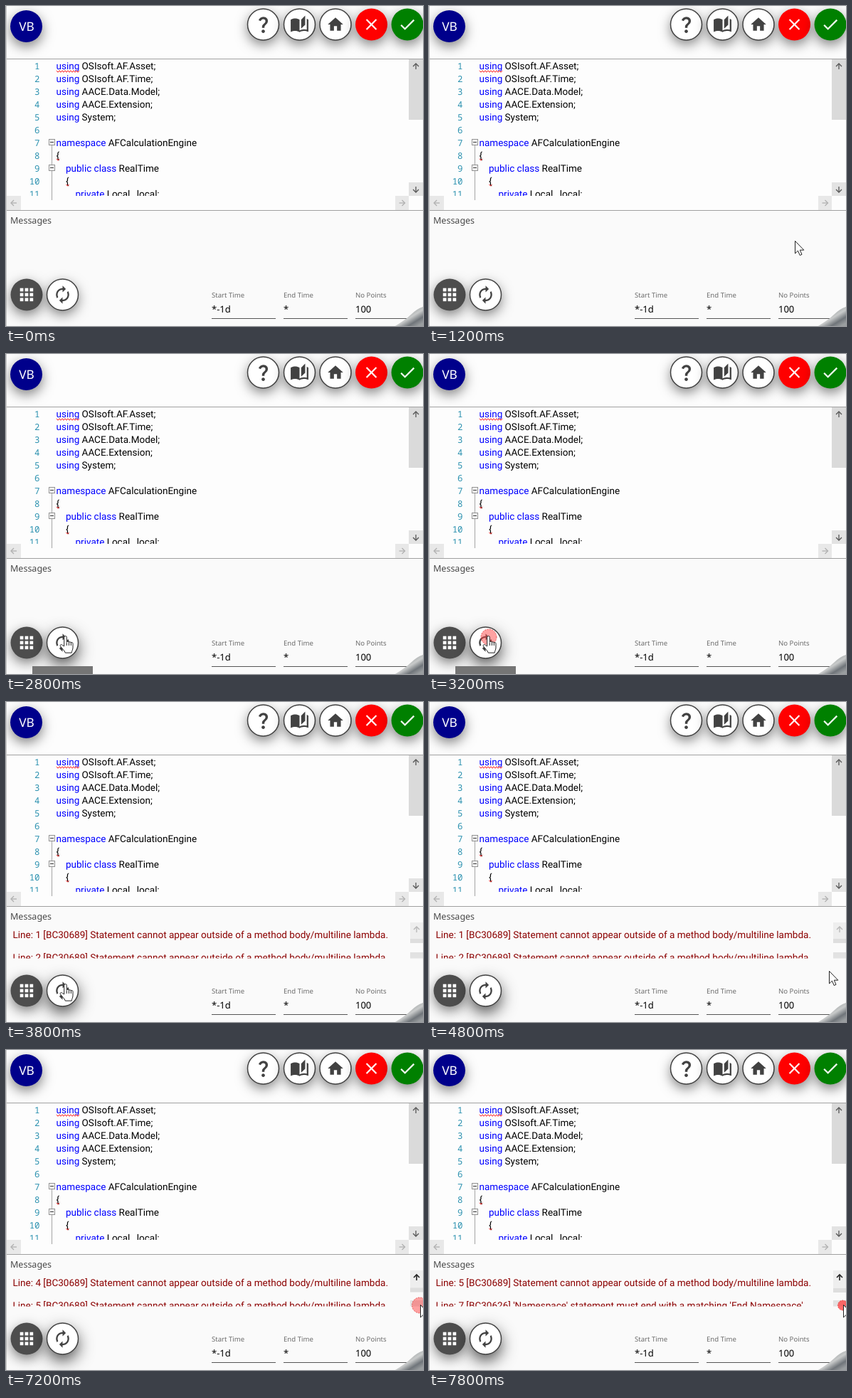
These frames come from a looping animation (586x450 px, 8000 ms). An HTML page with a canvas:

```html
<!DOCTYPE html>
<html lang="en">
<head>
<meta charset="utf-8">
<title>Code editor</title>
<style>
  html, body { margin: 0; width: 100%; height: 100%; overflow: hidden; background: #fafafa; }
  canvas { display: block; width: 586px; height: 450px; }
</style>
</head>
<body>
<canvas id="stage" width="586" height="450"></canvas>
<script>
const ctx = document.getElementById('stage').getContext('2d');
const LOOP = 8000, STEP = 200;
const CODE_FONT = '13.5px Roboto, sans-serif';
const MSG_FONT = '13.55px Roboto, sans-serif';
const UI = '"Noto Sans", sans-serif';
const DARK = '#424242', BLUE = '#0000ff', MAROON = '#8b0000';

const code = [
  'using| OSIsoft.AF.Asset;', 'using| OSIsoft.AF.Time;', 'using| AACE.Data.Model;',
  'using| AACE.Extension;', 'using| System;', '', 'namespace| AFCalculationEngine',
  '|{', 'public class| RealTime', '|{', 'private| Local _local;'
];
const indent = [0, 0, 0, 0, 0, 0, 0, 0, 13.5, 13.5, 27];

const outside = n => `Line: ${n} [BC30689] Statement cannot appear outside of a method body/multiline lambda.`;
const messages = [1, 2, 3, 4, 5].map(outside)
  .concat("Line: 7 [BC30626] 'Namespace' statement must end with a matching 'End Namespace'.");

// time, x, y of the pointer tip
const pointerPath = [
  [1200, 514, 330], [1600, 300, 338], [1800, 190, 346], [2000, 117, 364], [2200, 92, 383],
  [2400, 75.5, 396], [3800, 75.5, 396], [4000, 120, 399], [4200, 235, 406], [4400, 400, 414],
  [4600, 554, 412], [4800, 562, 378], [5000, 572, 362], [5200, 578, 348], [5600, 582, 358]
];

const icons = {
  help: new Path2D('M11.07 12.85c.77-1.39 2.25-2.21 3.11-3.44.91-1.29.4-3.7-2.18-3.7-1.69 0-2.52 1.28-2.87 2.34L6.54 6.96C7.25 4.83 9.18 3 11.99 3c2.35 0 3.96 1.07 4.78 2.41.7 1.15 1.11 3.3.03 4.9-1.2 1.77-2.35 2.31-2.97 3.45-.25.46-.35.76-.35 2.24h-2.89c-.01-.78-.13-2.05.48-3.15zM14 20c0 1.1-.9 2-2 2s-2-.9-2-2 .9-2 2-2 2 .9 2 2z'),
  book: new Path2D('M19 1l-5 5v11l5-4.5zM1 6v15.2C3 20.4 5 20 6.5 20c1.95 0 4.05.4 5.5 1.5V6c-1.45-1.1-3.55-1.5-5.5-1.5S2.45 4.9 1 6zm22 0c-.6-.45-1.25-.75-2-1v13.5c-1.1-.35-2.3-.5-3.5-.5-1.7 0-4.15.65-5.5 1.5v2c1.35-.85 3.8-1.5 5.5-1.5 1.65 0 3.35.3 5.5 1.1z'),
  home: new Path2D('M10 20v-6h4v6h5v-8h3L12 3 2 12h3v8z'),
  close: new Path2D('M19 6.4 17.6 5 12 10.6 6.4 5 5 6.4 10.6 12 5 17.6 6.4 19 12 13.4 17.6 19 19 17.6 13.4 12z'),
  check: new Path2D('M9 16.2 4.8 12l-1.4 1.4L9 19 21 7l-1.4-1.4z'),
  refresh: new Path2D('M12 6v3l4-4-4-4v3c-4.42 0-8 3.58-8 8 0 1.57.46 3.03 1.24 4.26L6.7 14.8c-.45-.83-.7-1.79-.7-2.8 0-3.31 2.69-6 6-6zm6.76 1.74L17.3 9.2c.44.84.7 1.79.7 2.8 0 3.31-2.69 6-6 6v-3l-4 4 4 4v-3c4.42 0 8-3.58 8-8 0-1.57-.46-3.03-1.24-4.26z')
};
const arrowShape = new Path2D('M.5 .5V18l4-3.8 2.7 6.4 2.8-1.2-2.7-6.2h5.5z');
const handShape = new Path2D('M6.2 15V2.4a1.8 1.8 0 0 1 3.6 0V9a1.7 1.7 0 0 1 3.1 .5 1.6 1.6 0 0 1 2.9 .7 1.5 1.5 0 0 1 2.7 1V17c0 3-1.6 4.5-1.8 7.2H7.8C7.3 21.5 2.5 17.5 .8 14.8c-1-1.8 1.6-3 3-1.4z');

function rect(x, y, w, h, fill) {
  ctx.fillStyle = fill;
  ctx.fillRect(x, y, w, h);
}

function text(s, x, y, font, fill, align = 'left') {
  ctx.font = font;
  ctx.fillStyle = fill;
  ctx.textAlign = align;
  ctx.fillText(s, x, y);
  return ctx.measureText(s).width;
}

function line(points, color, width = 1) {
  ctx.beginPath();
  points.forEach(([x, y]) => ctx.lineTo(x, y));
  ctx.strokeStyle = color;
  ctx.lineWidth = width;
  ctx.stroke();
}

function clipped(x, y, w, h, draw) {
  ctx.save();
  ctx.beginPath();
  ctx.rect(x, y, w, h);
  ctx.clip();
  draw();
  ctx.restore();
}

function disc(x, y, r, fill, border, raised) {
  ctx.save();
  ctx.shadowColor = raised ? 'rgba(0,0,0,.7)' : 'rgba(0,0,0,.5)';
  ctx.shadowBlur = raised ? 22 : 17;
  ctx.shadowOffsetY = raised ? 9 : 6;
  ctx.beginPath();
  ctx.arc(x, y, r, 0, Math.PI * 2);
  ctx.fillStyle = fill;
  ctx.fill();
  ctx.restore();
  if (border) {
    ctx.strokeStyle = border;
    ctx.lineWidth = 1.5;
    ctx.stroke();
  }
}

function icon(name, x, y, scale, fill) {
  ctx.save();
  ctx.translate(x, y);
  ctx.scale(scale, scale);
  ctx.translate(-12, -12);
  ctx.fillStyle = fill;
  ctx.fill(icons[name]);
  ctx.restore();
}

// Scrollbar arrow pointing along (dx, dy)
function chevron(x, y, dx, dy, color, width = 1.3) {
  const tip = [x + dx * 4, y + dy * 4];
  line([[x - dx * 4, y - dy * 4], tip], color, width);
  line([[x + dy * 4, y + dx * 4], tip, [x - dy * 4, y - dx * 4]], color, width);
}

function squiggle(x, y, w) {
  const pts = [];
  for (let i = 0; i <= w; i += 2) pts.push([x + i, y + (i % 4 ? 1.2 : -1.2)]);
  line(pts, '#ff2020');
}

function drawToolbar() {
  disc(28.5, 28.5, 22.5, '#00008b');
  text('VB', 29, 35, '500 17.3px ' + UI, '#fff', 'center');
  [361.5, 412.5, 463].forEach(x => disc(x, 26, 22, '#fff', DARK));
  disc(513.5, 26, 22.5, '#ff0000');
  disc(564, 26, 22.5, '#008000');

  icon('help', 361.5, 26, 1.2, DARK);
  icon('book', 412.5, 26, 1.13, DARK);
  icon('home', 463, 26, 1.08, DARK);
  icon('close', 513.5, 26, 1.1, '#fff');
  icon('check', 564, 26, 1.12, '#fff');
}

function drawCode() {
  clipped(0, 75, 566, 192, () => {
    code.forEach((row, i) => {
      const y = 89 + i * 18, [key, rest = ''] = row.split('|');
      text(i + 1, 47.5, y, '500 12.4px "Noto Sans Mono", monospace', '#2b91af', 'right');
      const x = 70.5 + indent[i];
      text(rest, x + text(key, x, y, CODE_FONT, BLUE), y, CODE_FONT, '#000');
    });
    squiggle(71, 92, 32);
    squiggle(71, 216, 4);
    squiggle(84.5, 252, 4);
  });
}

function drawFolds() {
  line([[64.5, 196], [64.5, 273]], '#a5a5a5');
  [187, 223].forEach(y => {
    rect(60, y, 9, 9, '#fff');
    ctx.strokeStyle = '#909090';
    ctx.lineWidth = 1;
    ctx.strokeRect(60.5, y + .5, 8, 8);
    rect(62, y + 4, 5, 1, '#333');
  });
}

function drawEditor() {
  rect(0, 74, 586, 214, '#fdfdfd');
  drawCode();
  drawFolds();
  rect(566, 75, 20, 85, '#dadada');
  rect(566, 248, 20, 19, '#e3e3e3');
  chevron(576, 85, 0, -1, '#555');
  chevron(576, 258, 0, 1, '#555');
  rect(1, 267, 20, 20, '#e8e8e8');
  rect(547, 267, 19, 20, '#e8e8e8');
  chevron(11, 277, -1, 0, '#b0b0b0');
  chevron(556.5, 277, 1, 0, '#b0b0b0');
  rect(0, 74, 586, 1, '#a0a0a0');
  rect(0, 287, 586, 1, '#a0a0a0');
  rect(0, 0, 1, 450, '#c8c8c8');
}

function drawMessages(t) {
  text('Messages', 6, 306, '12.5px ' + UI, '#484848');
  if (t < 3400) return;
  const top = t < 6400 ? 0 : Math.min(4, 1 + Math.floor((t - 6400) / 400));
  clipped(1, 309, 566, 51.5, () => {
    text(messages[top], 9.5, 332, MSG_FONT, MAROON);
    text(messages[top + 1], 9.5, 364, MSG_FONT, MAROON);
  });
  const hot = t >= 5200;
  rect(568, 310, 18, 28, '#eeeeee');
  rect(568, 333 + top * .5, 18, 6, '#dedede');
  rect(568, 352, 18, 8.5, '#e2e2e2');
  chevron(577, 320, 0, -1, hot ? '#222' : '#b5b5b5', hot ? 1.6 : 1.3);
}

function drawField(label, value, x, w) {
  text(label, x, 409.5, '9.6px ' + UI, '#6c6c6c');
  text(value, x, 431, '13px ' + UI, '#000');
  rect(x, 439, w, 1, '#555');
}

function drawFooter(t) {
  disc(29, 406, 22.5, '#4d4d4d');
  for (let i = 0; i < 9; i++) {
    rect(19.7 + i % 3 * 6.9, 396.7 + Math.floor(i / 3) * 6.9, 4.7, 4.7, '#fff');
  }
  disc(79.5, 406, 22, '#fff', DARK, t >= 2400);
  icon('refresh', 79.5, 406, 1.16, DARK);

  drawField('Start Time', '*-1d', 289, 90);
  drawField('End Time', '*', 390, 90);
  drawField('No Points', '100', 491, 90);

  const curl = ctx.createLinearGradient(563, 431, 576, 452);
  curl.addColorStop(0, '#a8acac');
  curl.addColorStop(.35, '#c8caca');
  curl.addColorStop(.7, '#70757a');
  curl.addColorStop(1, '#9a9ea0');
  ctx.fillStyle = curl;
  ctx.fill(new Path2D('M547 450Q562 441 569 434Q577 426 586 423V450z'));

  if (t >= 2600 && t < 3400) rect(37, 439, 85, 11, '#757575');
}

function pointerAt(t) {
  const next = pointerPath.findIndex(p => p[0] > t);
  if (next < 0) return pointerPath[pointerPath.length - 1].slice(1);
  const [t0, x0, y0] = pointerPath[next - 1], [t1, x1, y1] = pointerPath[next];
  const k = (t - t0) / (t1 - t0);
  return [x0 + (x1 - x0) * k, y0 + (y1 - y0) * k];
}

function drawClick(x, y, wide) {
  ctx.beginPath();
  ctx.arc(x, y, wide ? 11 : 7, 0, Math.PI * 2);
  ctx.fillStyle = wide ? 'rgba(255,70,70,.5)' : 'rgba(255,60,60,.75)';
  ctx.fill();
  ctx.strokeStyle = 'rgba(225,50,50,.7)';
  ctx.lineWidth = 1;
  ctx.setLineDash([2, 1.5]);
  ctx.stroke();
  ctx.setLineDash([]);
}

function drawPointer(t) {
  if (t < 1200) return;
  const [x, y] = pointerAt(t), hand = t >= 2400 && t < 4000;
  if (t === 3000 || t === 3200) drawClick(84, 398, t === 3200);
  if (t >= 6200) drawClick(581.5, 359, (t - 6200) % 400 >= 200);
  ctx.save();
  ctx.translate(x, y);
  const shape = hand ? handShape : arrowShape;
  ctx.fillStyle = '#fff';
  ctx.strokeStyle = '#222';
  ctx.lineWidth = 1;
  ctx.fill(shape);
  ctx.stroke(shape);
  if (hand) [9.8, 12.9, 15.8].forEach(k => line([[k, 9.5], [k, 14]], '#222'));
  ctx.restore();
}

function frame(now) {
  const t = Math.floor(now % LOOP / STEP) * STEP;
  ctx.textRendering = 'geometricPrecision';
  rect(0, 0, 586, 450, '#fafafa');
  rect(0, 0, 586, 74, '#fdfdfd');
  drawToolbar();
  drawEditor();
  drawMessages(t);
  drawFooter(t);
  drawPointer(t);
}

const start = performance.now();
function tick() {
  frame(performance.now() - start);
  requestAnimationFrame(tick);
}
tick();
</script>
</body>
</html>
```
